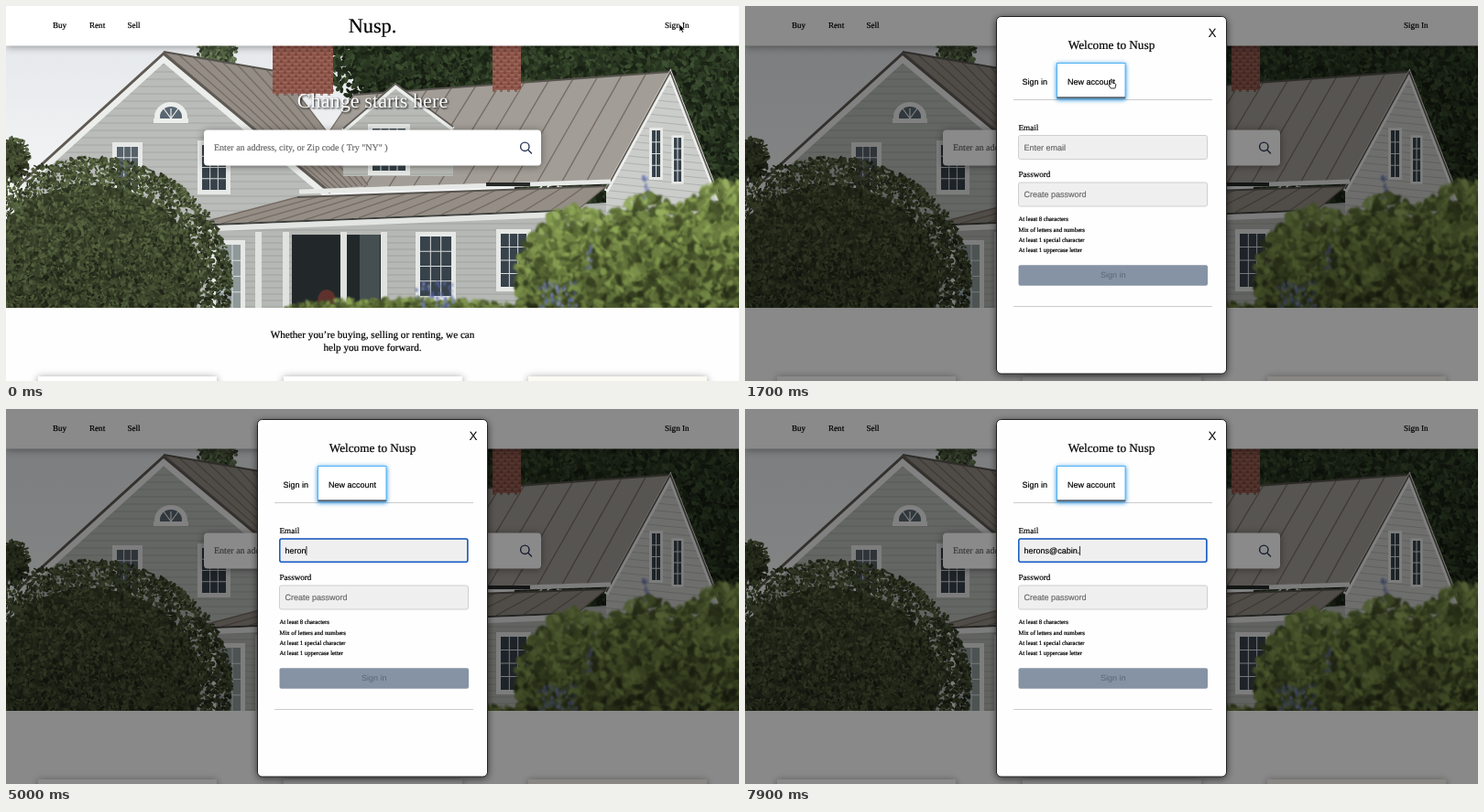
These frames come from a looping animation (800 by 410 pixels, 8 s). An HTML page with a canvas:

```html
<!DOCTYPE html>
<html lang="en">
<head>
<meta charset="utf-8">
<title>Home search sign-up</title>
<style>
  html, body { margin: 0; width: 100%; height: 100%; overflow: hidden; background: #fff; }
  canvas, svg { position: absolute; left: 0; top: 0; width: 800px; height: 410px; }
  text { font: 9.1px "Liberation Serif", "Times New Roman", serif; stroke: #000; stroke-width: .2px; text-rendering: geometricPrecision; }
  .sans { font: 9px "Liberation Sans", Arial, sans-serif; }
  .mid { text-anchor: middle; }
  .hint { font-size: 6.7px; }
  .ph { fill: #686868; stroke: #686868; }
  .plain { stroke: none; }
  .rule { stroke: #ccc; }
  .field { fill: #efefef; stroke: #cfcfcf; }
  .button { fill: #8593a4; }
  .tab { fill: #fff; stroke: #50b4f5; filter: drop-shadow(0 1px 2.5px #1488dd); }
  .mark { stroke: #5b6470; stroke-width: 2; }
  .soft { filter: drop-shadow(0 1px 4px #0006); }

  .anim { animation: 8s step-end infinite; }
  #modal { animation-name: modal; }
  .login { animation-name: login; }
  .signup { animation-name: signup; }
  #focus { animation-name: focus; }
  #arrow { animation-name: arrow; }
  #hand { animation-name: hand; }
  #beam { animation-name: beam; }
  #pointer { animation: travel 8s ease-in-out infinite; }
  @keyframes modal { 0% { opacity: 0 } 2.5%, 100% { opacity: 1 } }
  @keyframes login { 0% { opacity: 1 } 20%, 100% { opacity: 0 } }
  @keyframes signup { 0% { opacity: 0 } 20%, 100% { opacity: 1 } }
  @keyframes focus { 0% { opacity: 0 } 33.75%, 100% { opacity: 1 } }
  @keyframes arrow { 0% { opacity: 1 } 14% { opacity: 0 } 26.5% { opacity: 1 } 28.5%, 100% { opacity: 0 } }
  @keyframes hand { 0% { opacity: 0 } 14% { opacity: 1 } 26.5%, 100% { opacity: 0 } }
  @keyframes beam { 0% { opacity: 0 } 28.5% { opacity: 1 } 53.75%, 100% { opacity: 0 } }
  @keyframes travel {
    0%, 6.5% { transform: translate(735px, 20px) }
    14.5%, 25% { transform: translate(400px, 80px) }
    32%, 100% { transform: translate(387px, 153px) }
  }
</style>
</head>
<body>
<canvas id="photo" width="800" height="410"></canvas>
<svg viewBox="0 0 800 410">
  <!-- page -->
  <rect class="soft" y="-5" width="800" height="48.5" fill="#fff"/>
  <text x="51" y="24">Buy</text>
  <text x="91" y="24">Rent</text>
  <text x="132.5" y="24">Sell</text>
  <text x="719" y="24">Sign In</text>
  <text class="mid" x="400" y="28.5" style="font-size:22.3px">Nusp.</text>
  <text class="mid plain" x="400" y="111" fill="#fff" style="font-size:22.3px;filter:drop-shadow(1px 1px 1px #000)">Change starts here</text>
  <rect class="soft" x="216" y="135.5" width="368" height="39" rx="4" fill="#fff"/>
  <text class="ph" x="227" y="158" style="font-size:10px">Enter an address, city, or Zip code ( Try "NY" )</text>
  <g fill="none" stroke="#293556" stroke-width="1.4" stroke-linecap="round">
    <circle cx="566.3" cy="153.8" r="4.7"/><path d="M570 157.5 573.5 161"/>
  </g>
  <rect y="330" width="800" height="80" fill="#fefefe"/>
  <text class="mid" x="400" y="363" style="font-size:11.17px">Whether you’re buying, selling or renting, we can</text>
  <text class="mid" x="400" y="376.7" style="font-size:11.17px">help you move forward.</text>
  <g class="soft" fill="#fff">
    <rect x="35" y="405" width="195" height="20"/>
    <rect x="303" y="405" width="195" height="20"/>
    <rect x="570" y="405" width="195" height="20" fill="#fbfaf3"/>
  </g>

  <g id="modal" class="anim">
    <rect width="800" height="410" fill="#000" fill-opacity=".46"/>
    <rect x="274.5" y="11.5" width="251" height="390.5" rx="5" fill="#fefefe" stroke="#222" style="filter:drop-shadow(0 2px 4px #0009)"/>
    <text class="mid" x="400" y="47.2" style="font-size:13.24px">Welcome to Nusp</text>
    <text class="sans mid plain" x="510" y="34.3" style="font-size:13.5px">X</text>
    <path class="rule" d="M293 102.5H510"/>

    <g class="anim login">
      <rect class="tab" x="291" y="62.5" width="50" height="38.5"/><path class="mark" d="M291 100.3h50"/>
    </g>
    <g class="anim signup">
      <rect class="tab" x="340.5" y="62.5" width="74.5" height="38.5"/><path class="mark" d="M340.5 100.3h74.5"/>
    </g>
    <text class="sans" x="302.5" y="85.5">Sign in</text>
    <text class="sans" x="352" y="85.5">New account</text>

    <text x="298.5" y="136.2">Email</text>
    <rect class="field" x="298.5" y="141.5" width="206" height="26" rx="2"/>
    <text x="298.5" y="187.3">Password</text>
    <rect class="field" x="298.5" y="193" width="206" height="26" rx="2"/>

    <g class="anim login">
      <text class="sans ph" x="304.5" y="209">Enter password</text>
      <rect class="button" x="298.5" y="227.5" width="206.5" height="22.5" rx="2"/>
      <text class="sans mid plain" x="401.7" y="241.7" fill="#fff">Submit</text>
      <rect class="button" x="298.5" y="258" width="206.5" height="22.5" rx="2"/>
      <text class="sans mid plain" x="401.7" y="272.2" fill="#fff">Demo Sign in</text>
      <path class="rule" d="M293 311.5H510"/>
    </g>

    <g class="anim signup">
      <text class="sans ph" x="304.5" y="209">Create password</text>
      <text class="hint" x="298.5" y="235.4">At least 8 characters</text>
      <text class="hint" x="298.5" y="246.6">Mix of letters and numbers</text>
      <text class="hint" x="298.5" y="257.8">At least 1 special character</text>
      <text class="hint" x="298.5" y="269">At least 1 uppercase letter</text>
      <rect class="button" x="298.5" y="283.2" width="206.5" height="22.5" rx="2"/>
      <text class="sans mid plain" x="401.7" y="297.4" fill="#5a6675">Sign in</text>
      <path class="rule" d="M293 328.5H510"/>
    </g>

    <rect id="focus" class="anim" x="298.8" y="142" width="205" height="25.3" rx="2" fill="none" stroke="#1259c3" stroke-width="1.5"/>
    <text id="emailHint" class="sans ph" x="304.5" y="158">Enter email</text>
    <text id="email" class="sans" x="304.5" y="158"></text>
    <rect id="caret" y="150" width=".8" height="10"/>
  </g>

  <g id="pointer">
    <path id="arrow" class="anim" d="M0 0V8L1.9 6.4 3.1 9.2 4.5 8.6 3.3 5.9H5.8Z" stroke="#fff" stroke-width=".6"/>
    <path id="hand" class="anim" d="M-1 .5Q0-.5 .8.5V4L4 4.8Q5 5.2 4.7 7L3.8 10H-.8L-3.2 6.3Q-3.5 5-1 6Z" fill="#fff" stroke="#000" stroke-width=".8"/>
    <path id="beam" class="anim" d="M-2-4.5Q0-4.5 0-3.5Q0-4.5 2-4.5M0-3.5V3.5M-2 4.5Q0 4.5 0 3.5Q0 4.5 2 4.5" fill="none" stroke="#111" stroke-width=".9"/>
  </g>
</svg>

<script>
const $ = id => document.getElementById(id);

// ---- house picture
const ctx = $('photo').getContext('2d');
let seed = 7;
const rand = () => (seed = seed * 16807 % 2147483647) / 2147483647;
const mix = (a, b, k) => a.map((v, i) => v + (b[i] - v) * k);

function box(color, x, y, w, h) {
  ctx.fillStyle = color;
  ctx.fillRect(x, y, w, h);
}
function line(color, width, ...points) {
  ctx.strokeStyle = color;
  ctx.lineWidth = width;
  ctx.stroke(new Path2D('M' + points.join(' ')));
}
function oval(color, x, y, rx, ry, turn = 0) {
  ctx.fillStyle = color;
  ctx.beginPath();
  ctx.ellipse(x, y, rx, ry, turn, 0, 7);
  ctx.fill();
}
function siding(color, points, gap, slope = 0) {
  const area = new Path2D(`M${points.join(' ')}z`);
  ctx.fillStyle = color;
  ctx.fill(area);
  ctx.save();
  ctx.clip(area);
  for (let y = 0; y < 330; y += gap) line('#77797555', 1, [0, y], [800, y + 800 * slope]);
  ctx.restore();
}
// wall under a pitched roof, edged with pale boards and dark roof trim
function gable(color, apex, left, right, bottom, board, slope) {
  siding(color, [left, apex, right, [right[0], bottom], [left[0], bottom]], 8, slope);
  const inset = p => [p[0], p[1] + board / 2];
  line('#eceeec', board, ...[left, apex, right].map(inset));
  line('#5f5953', board / 3, left, apex, right);
}
// sloped metal sheet from ridge a-b to eave c-d
function roof(color, a, b, c, d, seams) {
  ctx.fillStyle = color;
  ctx.fill(new Path2D(`M${[a, b, d, c].join(' ')}z`));
  for (let i = 0; i <= seams; i++) line('#756b62', 1.3, mix(a, b, i / seams), mix(c, d, i / seams));
  line('#57534e', 2, a, b);
}
function pane(x, y, w, h, cols = 3, glass = '#37424a') {
  const frame = Math.min(5, w / 3), rows = 4;
  box('#e6e8e6', x - frame, y - frame, w + 2 * frame, h + 2 * frame);
  box(glass, x, y, w, h);
  for (let i = 1; i < cols; i++) box('#d9dddd', x + i * w / cols - .5, y, 1, h);
  for (let i = 1; i < rows; i++) box('#d9dddd', x, y + i * h / rows - .5, w, 1);
}
function brick(x, y, w, h) {
  box('#8f574b', x, y, w, h);
  for (let r = 0; r < h; r += 4) {
    box('#b5877c88', x, y + r, w, .8);
    for (let c = r % 8; c < w; c += 8) box('#6f3a3288', x + c, y + r, 3, 3);
  }
}
// leaves scattered over an ellipse, darker towards the bottom
function foliage([hue, sat, light], x, y, rx, ry, size) {
  const tone = l => `hsl(${hue} ${sat}% ${l}%)`;
  oval(tone(light), x, y, rx * .87, ry * .87);
  for (let i = rx * ry * 1.6 / size; i > 0; i--) {
    const angle = rand() * 6.283, r = 1.12 * rand() ** .6;
    const dy = r * Math.sin(angle);
    oval(tone(light * (.5 + rand() - dy * .25)), x + rx * r * Math.cos(angle), y + ry * dy,
      size * (.5 + rand()), size * (.3 + rand() * .5), rand() * 3);
  }
}
function flowers(x, y, w, h) {
  for (let i = w * h / 28; i > 0; i--) box(`hsl(230 32% ${45 + rand() * 22}%)`, x + rand() * w, y + rand() * h, 2, 4);
}

function drawHouse() {
  const sky = ctx.createLinearGradient(0, 43, 0, 200);
  sky.addColorStop(0, '#e6e9ec');
  sky.addColorStop(1, '#f3f4f5');
  box(sky, 0, 43, 800, 287);

  const forest = [98, 24, 17], hedge = [82, 22, 21], meadow = [78, 32, 31];
  foliage([90, 18, 32], 230, 50, 20, 22, 2.5);
  foliage(forest, 455, 60, 95, 55, 3.5);
  foliage(forest, 700, 90, 165, 160, 3.5);

  roof('#a29d96', [380, 97], [725, 72], [310, 201], [661, 190], 13);
  roof('#938d86', [172, 50], [300, 72], [349, 201], [395, 196], 8);
  brick(291, 43, 66, 53);
  brick(531, 43, 31, 49);

  // left gable
  gable('#b9bcb9', [172, 52], [14, 196], [354, 204], 330, 9);
  oval('#eceeec', 180, 121, 18, 16);
  oval('#596671', 180, 121, 12, 11);
  siding('#b9bcb9', [[160, 128], [200, 128], [200, 139], [160, 139]], 8);
  box('#eceeec', 161, 123, 38, 5);
  for (const dx of [-8, 0, 8]) line('#eee', 1.2, [180, 123], [180 + dx, 112]);
  pane(121, 154, 23, 47, 3, '#56616a');
  pane(214, 152, 26, 49);

  // dormer
  gable('#b8bab5', [425, 85], [368, 134], [488, 132], 186, 5);
  pane(400, 134, 36, 46, 4);

  // right gable
  gable('#cbcdca', [725, 72], [655, 200], [780, 215], 330, 5, .1);
  pane(705, 136, 9, 51, 2);
  pane(729, 144, 8, 48, 2);
  line('#e6e8e6', 5, [320, 203], [660, 192]);
  box('#262a28', 524, 193, 48, 4);

  // porch
  siding('#b5b8b4', [[205, 244], [655, 215], [655, 330], [205, 330]], 7);
  roof('#958e86', [318, 209], [655, 197], [205, 239], [625, 222], 14);
  line('#3f403c', 2, [203, 240], [628, 223]);
  line('#e3e5e3', 6, [205, 244], [628, 227]);
  box('#22282a', 312, 250, 97, 80);
  box('#454e50', 386, 250, 22, 80);
  for (const x of [272, 302, 365, 409]) box('#dfe2df', x, 247, 7, 83);
  oval('#5f312d', 350, 322, 10, 12);
  pane(229, 261, 27, 69, 3, '#8f9999');
  pane(452, 252, 34, 65);
  pane(540, 249, 28, 58);

  // garden
  foliage(hedge, 6, 168, 18, 22, 2.5);
  foliage(hedge, 92, 302, 138, 122, 2.5);
  ctx.filter = 'blur(1.2px)';
  for (let i = 0; i < 3; i++) foliage(meadow, 622 + 80 * i, 306 - 8 * i, 58, 76 + 6 * i, 5);
  foliage(meadow, 435, 332, 120, 11, 3);
  for (const x of [447, 580]) flowers(x, 300, 42, 28);
  for (const [x, y] of [[632, 260], [694, 180]]) flowers(x, y, 8, 28);
  ctx.filter = 'none';
}
drawHouse();

// ---- typing and caret
const address = 'herons@cabin.';
const focusAt = 2700;
// the name comes in one burst, the rest in a slower one
const keyTime = i => i < 6 ? 4300 + 150 * i : 5400 + 200 * i;

function frame() {
  const t = performance.now() % 8000;
  let typed = 0;
  while (typed < address.length && keyTime(typed) <= t) typed++;
  const lastInput = typed ? keyTime(typed - 1) : focusAt;
  $('email').textContent = address.slice(0, typed);
  $('emailHint').style.opacity = typed ? 0 : 1;
  $('caret').setAttribute('x', 304.5 + (typed ? $('email').getComputedTextLength() : 0));
  $('caret').style.opacity = t >= focusAt && (t - lastInput) % 1000 < 500 ? 1 : 0;
  requestAnimationFrame(frame);
}
frame();
</script>
</body>
</html>
```
